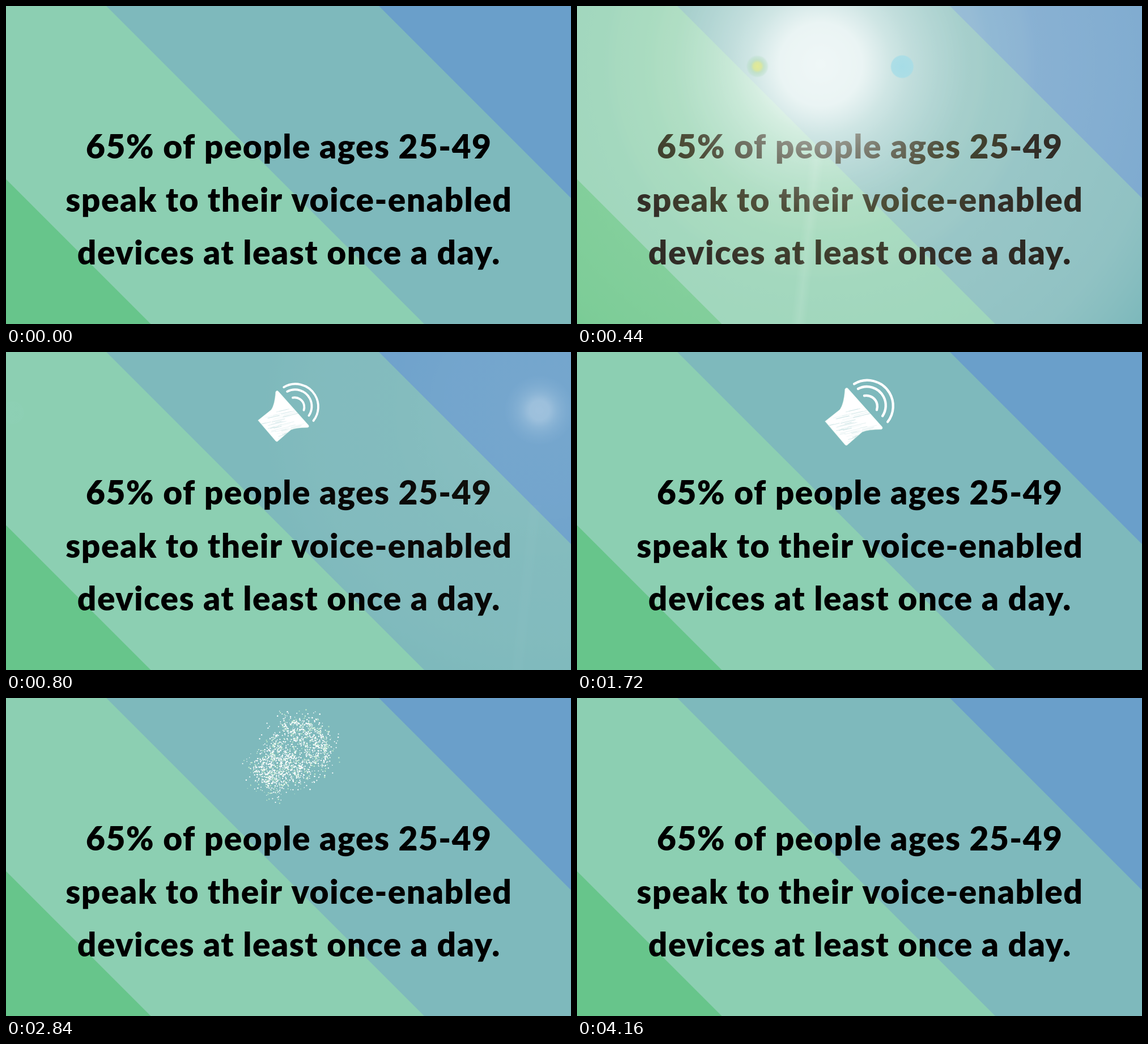
An HTML page with a canvas that plays this animation: 997 by 561 pixels, repeating every 4.36 s.

```html
<!DOCTYPE html>
<html lang="en">
<head>
<meta charset="utf-8">
<title>Voice-enabled devices</title>
<style>
html, body { margin: 0; width: 100%; height: 100%; overflow: hidden; }
canvas { display: block; }
</style>
</head>
<body>
<canvas id="stage" width="997" height="561"></canvas>
<script>
const W = 997, H = 561, LOOP = 4360, STEP = 40;
const CX = 498.5, CY = 106.5;   // centre of the speaker
const ctx = document.getElementById('stage').getContext('2d');
const TEAL = '#7eb9bc';

const clamp = x => Math.min(1, Math.max(0, x));
const ramp = (t, a, b) => clamp((t - a) / (b - a));
const easeSine = p => (1 - Math.cos(Math.PI * p)) / 2;

let seed = 7;
function rnd() {
  seed = (seed * 1664525 + 1013904223) % 4294967296;
  return seed / 4294967296;
}
const between = (a, b) => a + (b - a) * rnd();

// Background and text
const LINES = [
  ['65% of people ages 25-49', 269],
  ['speak to their voice-enabled', 362.5],
  ['devices at least once a day.', 456]
];
ctx.font = '900 58.5px Lato, "Open Sans", sans-serif';
ctx.textAlign = 'center';
// One tracking for all lines, from the measure of the longest
const tracking = (788 - ctx.measureText(LINES[1][0]).width) / LINES[1][0].length;
ctx.letterSpacing = tracking + 'px';

// Fills everything to the lower left of the diagonal that meets the top edge at x
function band(x, color) {
  ctx.fillStyle = color;
  ctx.beginPath();
  ctx.moveTo(x, 0);
  ctx.lineTo(x + H, H);
  ctx.lineTo(x - H - W, H);
  ctx.lineTo(x - H - W, 0);
  ctx.fill();
}

function drawBase() {
  ctx.fillStyle = '#6a9fca';
  ctx.fillRect(0, 0, W, H);
  band(658, TEAL);
  band(177, '#8ccfb2');
  band(-305.5, '#67c58b');
  ctx.fillStyle = '#000';
  for (const [text, y] of LINES) ctx.fillText(text, CX + tracking / 2, y);
}

// Speaker at its full size
const body = new Path2D(
  'M431 124 L460 101 Q468 90 470 61 Q473 56 477 61 L543 135 Q545 139 541 140' +
  ' Q516 140 504 145 L474 171 Q472 172 470 170 Z');
const waves = new Path2D();
const deg = Math.PI / 180;
for (const [x, y, r, from, to] of [
  [514, 94, 50.5, -121, 38], [513, 93, 37, -118, 34], [512, 95, 21.5, -101, 18]
]) {
  waves.moveTo(x + r * Math.cos(from * deg), y + r * Math.sin(from * deg));
  waves.arc(x, y, r, from * deg, to * deg);
}

// Gaps left by the pencil hatching
const gaps = Array.from({ length: 44 }, () => {
  const u = rnd(), v = rnd();
  return {
    x: 428 + 42 * u + 55 * v, y: 124 + 46 * u - 24 * v,
    length: between(10, 42), width: between(0.4, 1), alpha: between(0.15, 0.5)
  };
});

function drawSpeaker(scale, alpha, revealX) {
  ctx.save();
  ctx.beginPath();
  ctx.rect(0, 0, revealX, H);
  ctx.clip();
  ctx.globalAlpha = alpha;
  ctx.translate(CX, CY);
  ctx.scale(scale, scale);
  ctx.translate(-CX, -CY);
  ctx.lineCap = 'round';
  ctx.fillStyle = ctx.strokeStyle = '#fff';
  ctx.fill(body);
  ctx.lineWidth = 4.8;
  ctx.stroke(waves);
  ctx.strokeStyle = 'rgba(215,240,228,.6)';
  ctx.lineWidth = 1;
  ctx.stroke(body);
  ctx.clip(body);
  ctx.strokeStyle = TEAL;
  for (const g of gaps) {
    ctx.globalAlpha = alpha * g.alpha;
    ctx.lineWidth = g.width;
    ctx.beginPath();
    ctx.moveTo(g.x, g.y);
    ctx.lineTo(g.x + g.length, g.y - g.length * 0.24);
    ctx.stroke();
  }
  ctx.restore();
}

// Dust that the speaker breaks into
function pointIn(test) {
  let x, y;
  do {
    x = between(430, 568);
    y = between(40, 173);
  } while (!test(x, y));
  return { x, y };
}
ctx.lineWidth = 5;
const inBody = (x, y) => ctx.isPointInPath(body, x, y);
const inWaves = (x, y) => ctx.isPointInStroke(waves, x, y);
const dust = Array.from({ length: 1700 }, (_, i) => {
  const p = pointIn(i % 5 < 3 ? inBody : inWaves);
  const reach = 43 * rnd() ** 1.7;
  const angle = between(0, 2 * Math.PI);
  return {
    ...p,
    dx: reach * Math.cos(angle), dy: reach * Math.sin(angle),
    r: between(0.65, 1.3),
    end: between(3050, 4160),
    color: rnd() < 0.25 ? '#bfeaca' : '#fff'
  };
});

function drawDust(t, alpha) {
  const spread = 1 - Math.exp(-(t - 2440) / 350);
  for (const p of dust) {
    ctx.globalAlpha = alpha * clamp((p.end - t) / 300);
    if (!ctx.globalAlpha) continue;
    ctx.fillStyle = p.color;
    ctx.beginPath();
    ctx.arc(p.x + p.dx * spread, p.y + p.dy * spread, p.r, 0, 2 * Math.PI);
    ctx.fill();
  }
  ctx.globalAlpha = 1;
}

// Lens flare
const flareX = t => 430 + (t - 440) * 1.42;

function glow(x, y, r, stops) {
  const g = ctx.createRadialGradient(x, y, 0, x, y, r);
  for (const [at, color] of stops) g.addColorStop(at, `rgba(${color})`);
  ctx.fillStyle = g;
  ctx.fillRect(x - r, y - r, 2 * r, 2 * r);
}

function drawFlare(t) {
  const u = t < 440 ? (440 - t) / 380 : (t - 440) / 510;
  if (u >= 1) return;
  const power = Math.cos(u * Math.PI / 2) ** 2;
  const x = flareX(t), y = 103;
  ctx.save();
  ctx.globalCompositeOperation = 'screen';
  ctx.globalAlpha = power;
  glow(x, y, 720 * (0.6 + 0.4 * power), [
    [0, '100,98,94,1'], [0.28, '86,86,72,1'], [0.39, '76,76,54,1'],
    [0.42, '66,68,48,1'], [0.5, '60,57,44,1'], [0.53, '52,47,41,1'],
    [0.7, '44,40,34,1'], [0.84, '36,32,27,1'], [0.92, '20,18,14,1'], [1, '0,0,0,1']
  ]);

  // Soft, slightly slanted ray below the light
  const ray = ctx.createLinearGradient(x - 40, 440, x - 12, 443);
  ray.addColorStop(0, 'rgba(255,255,255,0)');
  ray.addColorStop(0.5, 'rgba(255,255,255,.1)');
  ray.addColorStop(1, 'rgba(255,255,255,0)');
  ctx.fillStyle = ray;
  ctx.fillRect(x - 70, 270, 90, H - 270);

  ctx.globalAlpha = power ** 0.6;
  glow(x, y, 260 * (0.05 + 0.95 * power), [
    [0, '248,252,250,.82'], [0.28, '246,250,248,.77'], [0.36, '245,250,246,.64'],
    [0.48, '242,250,240,.44'], [0.62, '240,248,232,.27'],
    [0.78, '240,248,228,.13'], [1, '240,248,228,0']
  ]);

  ctx.globalCompositeOperation = 'source-over';
  ctx.globalAlpha = power ** 2;
  const ghost = k => CX + k * (CX - x);
  glow(ghost(-2.63), 106.5, 20, [
    [0, '228,234,140,.9'], [0.36, '218,230,145,.8'], [0.6, '175,217,175,.5'],
    [0.85, '172,217,185,.3'], [1, '172,217,185,0']
  ]);
  glow(ghost(1.1), 107, 21, [
    [0, '163,220,231,.9'], [0.9, '167,221,231,.85'], [1, '170,222,230,0']
  ]);
  ctx.restore();
}

function draw(t) {
  drawBase();
  const breakUp = ramp(t, 2440, 2680);
  if (t > 440 && breakUp < 1) {
    const width = 109 + 28.5 * easeSine(ramp(t, 900, 2550));
    drawSpeaker(width / 137, 1 - breakUp, flareX(t));
  }
  if (t > 2440 && t < 4160) drawDust(t, ramp(t, 2440, 2520));
  if (t >= 80) drawFlare(t);
}

const start = performance.now();
function tick() {
  const t = (performance.now() - start) % LOOP;
  draw(Math.min(4160, Math.floor(t / STEP) * STEP));
  requestAnimationFrame(tick);
}
tick();
</script>
</body>
</html>
```
